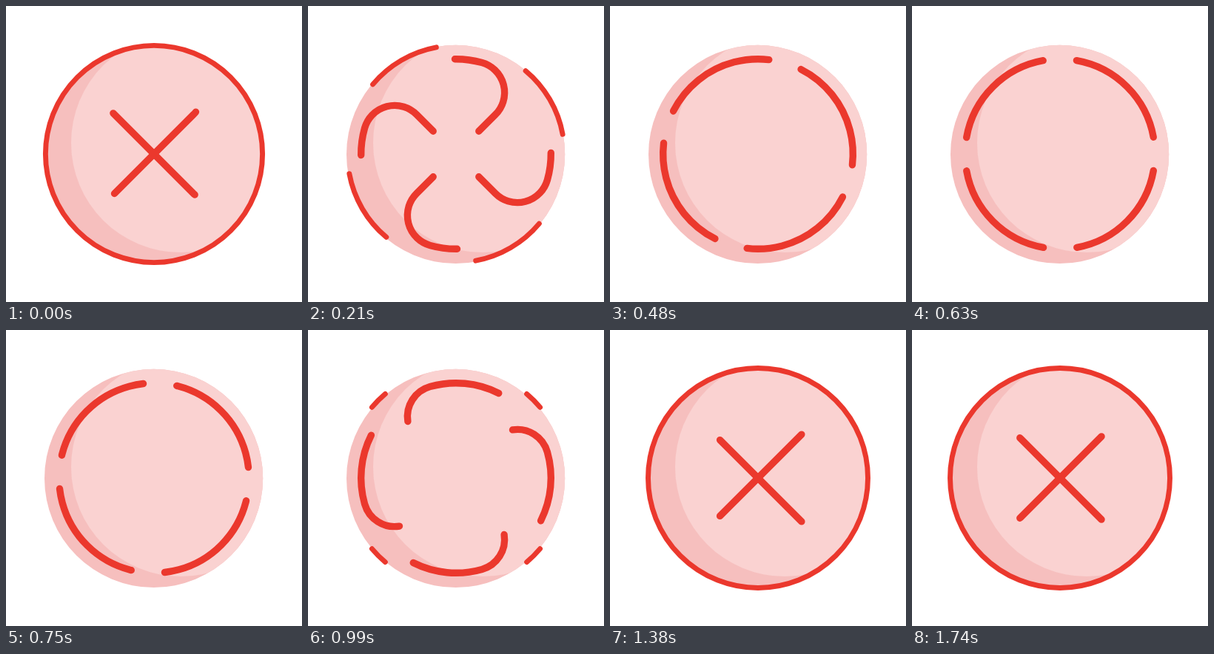
Write an HTML page that moves like this. It is 400x400 px and loops after 3.86 s.

```html
<!DOCTYPE html>
<html lang="en">
<head>
<meta charset="utf-8">
<title>Close badge</title>
<style>
  html, body { margin: 0; width: 100%; height: 100%; overflow: hidden; background: #fff; }
  svg { display: block; width: 100vw; height: 100vh; }
</style>
</head>
<body>
<svg viewBox="0 0 400 400">
  <defs>
    <clipPath id="disc"><circle cx="199.6" cy="200.4" r="147.6"/></clipPath>
  </defs>
  <g clip-path="url(#disc)">
    <rect width="400" height="400" fill="#f6bfbe"/>
    <circle cx="236" cy="185" r="148" fill="#fad2d1"/>
  </g>
  <g id="art" transform="translate(200 200)" fill="none" stroke="#eb382d" stroke-linecap="round">
    <circle id="ring" stroke-width="6.9" pathLength="360" transform="scale(1 -1)"/>
  </g>
</svg>
<script>
const LOOP = 3860;
const R = 128.3;          // orbit radius
const BEND = 42;          // radius of the turn between arm and orbit
const ARM = 78;           // half length of a cross bar
const LINE = Math.sqrt(R * R - 2 * R * BEND);
const JOIN = Math.atan2(BEND, LINE);
const ORBIT = 3 * Math.PI - 2 * JOIN;
const TRAVEL = 2 * LINE + 2 * BEND * (Math.PI / 2 + JOIN) + ORBIT * R;
const OVERSHOOT = 4;

const art = document.getElementById('art');
const ring = document.getElementById('ring');

const clamp = x => Math.min(1, Math.max(0, x));
const ease = x => (1 - Math.cos(Math.PI * clamp(x))) / 2;
const span = (t, from, to) => ease((t - from) / (to - from));

// Out along an arm, one and a half turns on the orbit, back in along the far arm
function trackPath() {
  const arc = (r, x, y) => `A${r} ${r} 0 0 0 ${x} ${y}`;
  const onOrbit = a => arc(R, R * Math.cos(a), -R * Math.sin(a));
  let d = `M${-ARM} 0L${LINE} 0` + arc(BEND, R * Math.cos(JOIN), -R * Math.sin(JOIN));
  for (let i = 1; i <= 4; i++) d += onOrbit(JOIN + ORBIT * i / 4);
  return d + arc(BEND, -LINE, 0) + `L${ARM + 20} 0`;
}

// Heads point SE, NE, NW, SW
const bars = [45, -45, -135, 135].map(angle => {
  const p = document.createElementNS('http://www.w3.org/2000/svg', 'path');
  p.setAttribute('d', trackPath());
  p.setAttribute('transform', `rotate(${angle})`);
  p.setAttribute('stroke-width', 9.4);
  p.setAttribute('stroke-dasharray', `${2 * ARM} 4000`);
  art.appendChild(p);
  return p;
});

function drawRing(t) {
  let from, to;
  if (t < 600) {
    const p = span(t, 0, 390);
    from = 18.7 * p;
    to = 90 - 71.3 * p;
  } else {
    const half = 45 * span(t, 900, 1320);
    from = 45 - half;
    to = 45 + half;
  }
  const len = to - from;
  ring.setAttribute('r', t < 600 ? 146.6 : 148.5);
  ring.setAttribute('stroke-dasharray', len > 89.9 ? 'none' : `${len} ${90 - len}`);
  ring.setAttribute('stroke-dashoffset', -from);
  ring.style.display = len > 0.1 ? '' : 'none';
}

function drawBars(t) {
  const moved = (TRAVEL + OVERSHOOT) * ease((t + 48) / 1359) - OVERSHOOT * span(t, 1380, 1720);
  const paired = t < 25 || t > 1311;
  bars.forEach((bar, i) => {
    const lag = (i === 1 ? 2 : 4.3) * clamp(1 - t / 120);
    bar.setAttribute('stroke-dashoffset', -Math.max(0, moved - lag));
    bar.style.display = paired && i > 1 ? 'none' : '';
  });
}

let start;
function frame(now) {
  if (start === undefined) start = now;
  const t = (now - start) % LOOP;
  drawRing(t);
  drawBars(t);
  requestAnimationFrame(frame);
}
drawRing(0);
drawBars(0);
requestAnimationFrame(frame);
</script>
</body>
</html>
```
